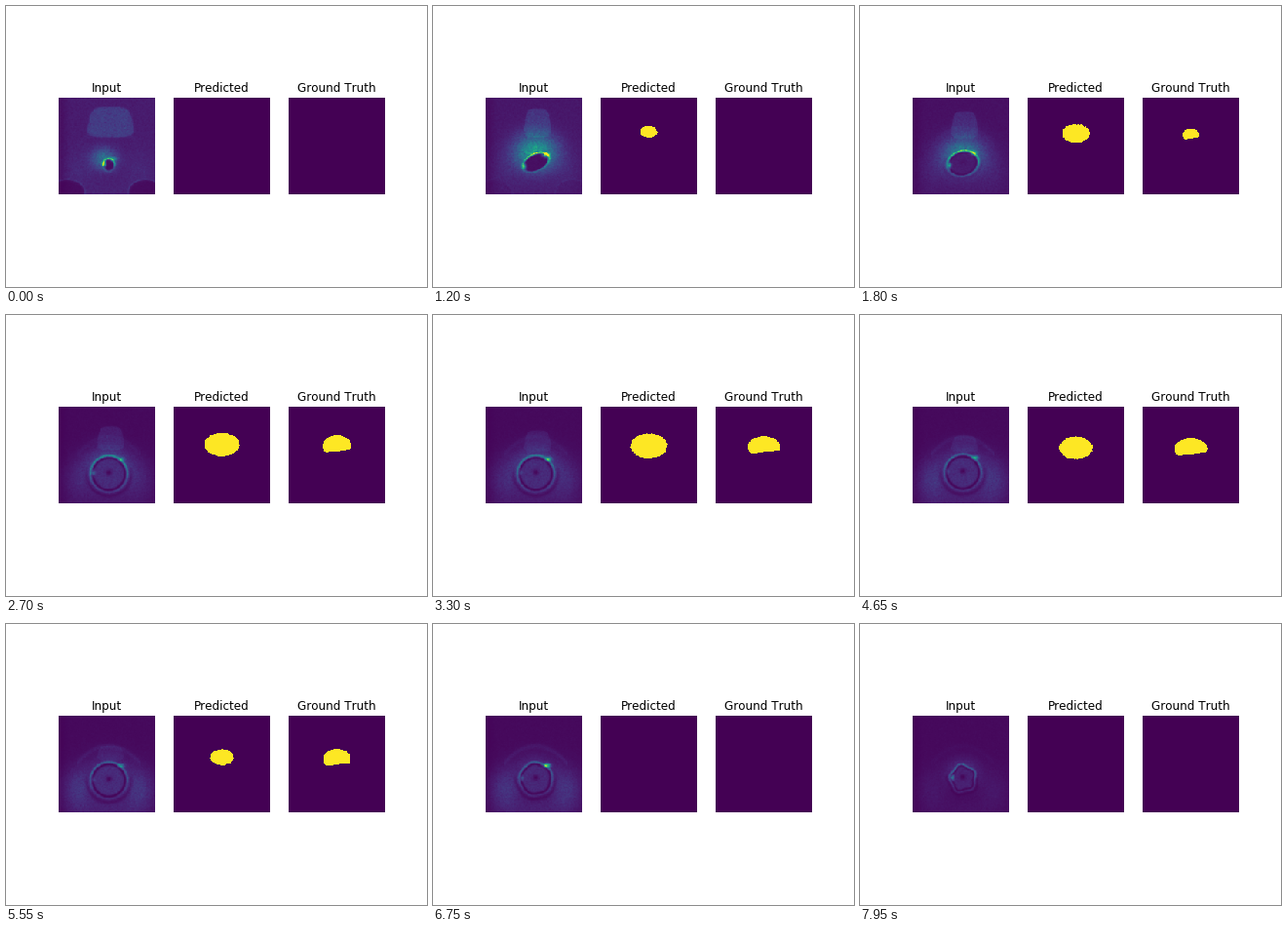
A matplotlib script that plays this animation: 432 by 288 pixels, repeating every 8100 ms.

```python
import numpy as np
import matplotlib.pyplot as plt
from matplotlib.animation import FuncAnimation

FRAMES, INTERVAL = 54, 150
N, SIDE = 128, 98.5

axis = (np.arange(N) + .5) * SIDE / N
X, Y = np.meshgrid(axis, axis)


def ramp(i, start, end):
    t = np.clip((i - start) / (end - start), 0, 1)
    return t * t * (3 - 2 * t)


def swell(i, middle, half):
    """Half-ellipse rise and fall, zero outside the span."""
    return np.sqrt(max(0, 1 - ((i - middle) / half) ** 2))


def bump(x, y, sx, sy=None):
    return np.exp(-((X - x) / sx) ** 2 / 2 - ((Y - y) / (sy or sx)) ** 2 / 2)


def band(d, width):
    return np.exp(-(d / width) ** 2)


def step(v):
    return 1 / (1 + np.exp(-np.clip(v, -40, 40)))


def grain(seed):
    n = np.random.default_rng(seed).normal(size=(N, N))
    return sum(np.roll(n, (a, b), (0, 1)) for a in (0, 1) for b in (0, 1)) / 2


COARSE = grain(7)


def body(i):
    """Background tissue, pelvic arch and the bones in the lower corners."""
    img = (.075 - .05 * ramp(i, 3, 18)) * (.5 + .5 * step((X - 7) / 2))
    soft = .035 + .085 * ramp(i, 8, 36) - .085 * ramp(i, 44, 53)
    img += soft * (bump(20, 76, 11, 15) + bump(82, 76, 11, 15)
                   + .5 * bump(51, 94, 20, 7))
    arch = Y - 31 - (X - 51) ** 2 / 60
    img += .25 * soft * band(arch, 2.5) * (np.abs(X - 51) < 32)

    early = 1 - ramp(i, 0, 12)
    for cx in (9, 89):
        d = np.hypot((X - cx) / 17, (Y - 96) / 12)
        img *= 1 - .7 * early * step((1 - d) * 20)
        img += .05 * early * band(d - 1.06, .06)
    return img


def bladder(i):
    level = .10 - .06 * ramp(i, 0, 24) - .04 * ramp(i, 34, 44)
    width = 24.5 - 10.5 * ramp(i, 0, 8)
    height = 15 - 8 * ramp(i, 0, 40)
    v = (Y - 25 - 13 * ramp(i, 4, 30)) / height
    u = (X - 53) / (width * (.88 + .12 * v))
    d = (np.abs(u) ** 4 + np.abs(v) ** 4) ** .25
    return level * (step((1 - d) * 25) + .35 * band(d - 1, .05))


def scan(i):
    opening, growing = ramp(i, 0, 8), ramp(i, 8, 17)
    closing, pinch = ramp(i, 40, 53), opening - growing
    rx = 5.5 + 8 * opening + 4 * growing - 5.5 * closing
    ry = 6 + 2 * opening + 9.3 * growing - 4.5 * closing
    cx = 51.3
    cy = 68.5 - 2.5 * pinch - 4.5 * ramp(i, 18, 53)
    size = np.sqrt(rx * ry)

    img = body(i) + bladder(i)
    glow = .28 + .22 * pinch - .15 * ramp(i, 16, 38)
    reach = 9 + 6 * opening - 4 * closing
    img += glow * bump(cx - 5 * (1 - opening), cy - 6 - 4 * pinch,
                       reach, reach * .85)

    # Probe: dark wall, dim core, bright upper rim.
    dx, dy = X - cx, Y - cy
    c, s = np.cos(-.45 * pinch), np.sin(-.45 * pinch)
    d = np.hypot((dx * c + dy * s) / rx, (dy * c - dx * s) / ry)
    d += .08 * closing * np.sin(5 * np.arctan2(dy, dx) + 1)
    img *= 1 - .5 * growing * band(d - 1.3, .12) * step((dy + 4) / 3)
    inside = step((1 - d) * size * 2)
    core = (.04 + .08 * growing - .03 * closing) * step((.88 - d) * size * 2)
    core *= 1 - .85 * growing * bump(cx, cy - 1.5, 2.2)
    img = img * (1 - inside) + core * inside
    rim = .45 - .27 * ramp(i, 0, 30)
    img += rim * (.25 + .75 * step(-dy / size * 4)) * band((d - 1.08) * size, 1.1)

    # Hot spots on either side of the rim.
    right = (.45 + .2 * np.cos(2 * np.pi * (i - 26) / 19)) * (1 - ramp(i, 46, 53))
    left = .7 - .6 * ramp(i, 6, 24) + .2 * closing
    img += right * bump(cx + .65 * (rx + 2), cy - .8 * (ry + 1.5), 2.2, 1.4)
    img += left * bump(cx - .9 * rx, cy - 1 + 5 * pinch, 1.3, 1.8)
    return np.clip(img * (1 + .06 * grain(100 + i) + .05 * COARSE), 0, 1)


def predicted(i):
    rx = 18.7 * swell(i, 23.5, 17.6)
    if rx < 1:
        return np.zeros((N, N))
    ease = np.sin(np.pi / 2 * np.clip((i - 8) / 29, 0, 1))
    cy = 34.8 + 7.5 * ease
    d = np.hypot((X - 49.3) / rx, (Y - cy) / (rx * .68))
    return (d < 1 + .3 / rx * COARSE).astype(float)


def truth(i):
    """Dome with a slanted, nearly flat base."""
    rx = 17 * swell(i, 27, 17.2)
    if rx < 1:
        return np.zeros((N, N))
    ry = min(9.8, .7 * rx)
    dx, dy = X - 49.3, Y - 39 - .237 * (i - 18)
    power = np.where(dy < 0, 2, 3)
    dome = np.abs(dx / rx) ** power + np.abs(dy / ry) ** power < 1
    return (dome & (dy < .66 * ry - .13 * dx)).astype(float)


plt.rcParams.update({'font.family': 'DejaVu Sans', 'text.kerning_factor': 6})
fig, axes = plt.subplots(1, 3, figsize=(6, 4), dpi=72, facecolor='white')
fig.subplots_adjust(left=.125, right=.9, bottom=.125, top=.88, wspace=.2)

panels = []
for ax, title, draw in zip(axes, ('Input', 'Predicted', 'Ground Truth'),
                           (scan, predicted, truth)):
    ax.set_title(title, fontsize=12)
    ax.axis('off')
    image = ax.imshow(draw(0), cmap='viridis', vmin=0, vmax=1,
                      interpolation='nearest')
    panels.append((image, draw))


def update(i):
    for image, draw in panels:
        image.set_data(draw(i))
    return [image for image, _ in panels]


anim = FuncAnimation(fig, update, frames=FRAMES, interval=INTERVAL,
                     repeat=True, repeat_delay=0, blit=False)
plt.show()
```
